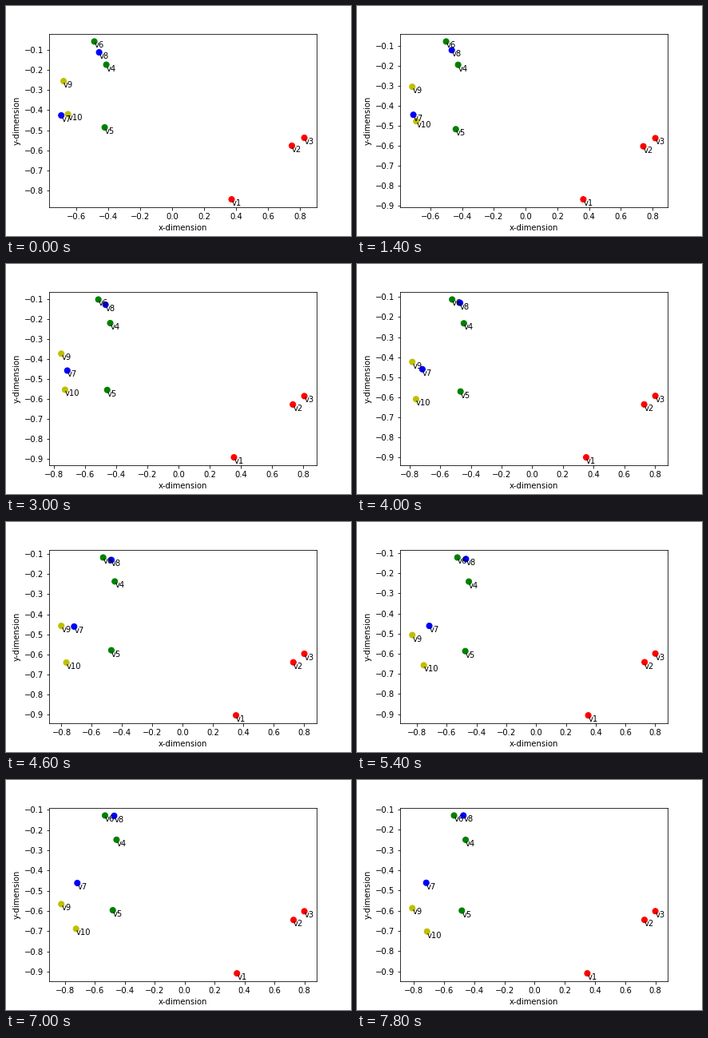
A matplotlib script that plays this animation: 432x288 px, repeating every 8 s.

```python
import numpy as np
import matplotlib.pyplot as plt
from matplotlib.animation import FuncAnimation

FRAMES, STEP_MS = 40, 200
LAST = FRAMES - 1
COLORS = "rrrgggbbyy"
plt.rcParams["text.kerning_factor"] = 6


def settle(t, start, end, tau):
    """Slow start, then an exponential approach to the resting place."""
    start, end = np.array(start), np.array(end)
    return start + (end - start) * (1 - np.exp(-(t / tau) ** 1.35))


def orbit(t, radius, speed, angle, turn):
    """Drift outwards while turning; slide along the unit circle once there."""
    u = t / LAST
    a = np.radians(angle + turn * (u - .012 * np.sin(2 * np.pi * u)))
    r = min(1, radius + speed * t + 3.05e-6 * t ** 3)
    return -r * np.cos(a), -r * np.sin(a)


def positions(t):
    return np.array([
        settle(t, (.3725, -.844), (.349, -.9095), 12),
        settle(t, (.750, -.577), (.727, -.6455), 12),
        settle(t, (.828, -.5375), (.799, -.6025), 12),
        settle(t, (-.4125, -.1736), (-.458, -.253), 16.5),
        settle(t, (-.4225, -.4857), (-.484, -.604), 16.5),
        settle(t, (-.4875, -.058), (-.535, -.1328), 16.5),
        settle(t, (-.6945, -.426), (-.717, -.462), 8.5),
        settle(t, (-.4575, -.112), (-.471, -.1297), 8.5),
        orbit(t, .7262, .00694, 20.56, 15.4),
        orbit(t, .776, .0086, 32.77, 11.85)])


fig, ax = plt.subplots(figsize=(6, 4), dpi=72)
fig.subplots_adjust(left=.125, right=.9, bottom=.125, top=.88)


def draw(frame):
    points = positions(frame)
    ax.clear()
    ax.scatter(*points.T, s=50, c=list(COLORS))
    for n, (x, y) in enumerate(points, 1):
        ax.text(x, y, f"v{n}", ha="left", va="top")
    ax.set_xlabel("x-dimension")
    ax.set_ylabel("y-dimension")
    return ax.get_children()


anim = FuncAnimation(fig, draw, frames=FRAMES, interval=STEP_MS,
                     repeat=True, repeat_delay=0)
plt.show()
```
